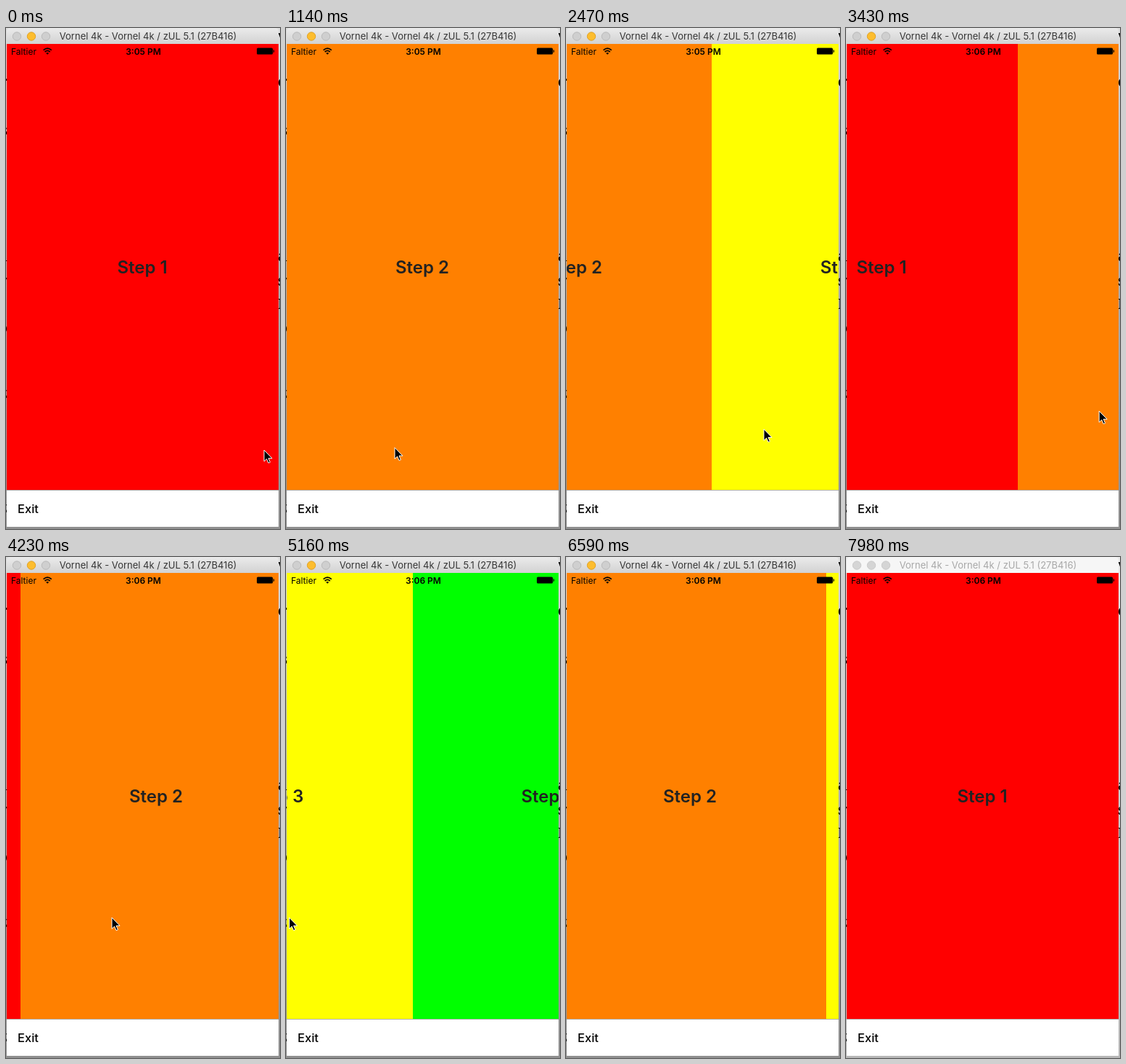
These frames come from a looping animation (378 px wide and 692 px high, 8.08 s). An HTML page:

```html
<!DOCTYPE html>
<html lang="en">
<head>
<meta charset="utf-8">
<title>Paged steps</title>
<style>
  html, body { margin: 0; width: 100%; height: 100%; overflow: hidden; background: #fff; }
  svg { display: block; width: 378px; height: 692px; font-family: Inter, Roboto, sans-serif; }
  .behind { font: 19px "Noto Serif", serif; }
  .light { fill: #cfcfcf; stroke: #b9b9b9; }
  .light.amber { fill: #fdbd2e; stroke: #dfa023; }
  .title { font-size: 13px; fill: #363636; }
  .inactive .bar { fill: #f6f6f6; }
  .inactive .light { fill: #d5d5d5; stroke: #cacaca; }
  .inactive .title { fill: #a8a8a8; }
  .inactive .shade { opacity: .65; }
  .label { font-size: 24px; font-weight: 600; fill: #222; }
  .status { font-size: 12px; }
  .exit { font-size: 16.5px; font-weight: 500; }
</style>
</head>
<body>
<svg viewBox="0 0 378 692">
  <defs>
    <linearGradient id="metal" x2="0" y2="1">
      <stop stop-color="#ebebeb"/><stop offset="1" stop-color="#d2d2d2"/>
    </linearGradient>
    <linearGradient id="shadow" x2="0" y2="1">
      <stop stop-color="#dedede"/><stop offset=".3" stop-color="#bcbcbc"/><stop offset="1" stop-color="#909090"/>
    </linearGradient>
    <clipPath id="screen"><path d="M1 22h375v616H1z"/></clipPath>
  </defs>

  <g id="window">
    <path class="shade" fill="url(#shadow)" d="M0 0h378v692H0z"/>
    <g class="behind" text-anchor="end">
      <text x="2" y="81">r</text><text x="2" y="148">s</text><text x="2" y="322">l</text>
      <text x="2" y="356">v</text><text x="2" y="421">o</text><text x="2" y="511">z</text><text x="2" y="669">z</text>
    </g>
    <g class="behind">
      <text x="375" y="18">v</text><text x="375" y="81">e</text><text x="375" y="322">a</text>
      <text x="375" y="356">s</text><text x="375" y="388">E</text>
    </g>

    <path class="bar" fill="url(#metal)" d="M1 22V5q0-5 5-5h365q5 0 5 5v17z"/>
    <circle class="light" cx="15" cy="11.5" r="5.7"/>
    <circle class="light amber" cx="35" cy="11.5" r="5.7"/>
    <circle class="light" cx="55" cy="11.5" r="5.7"/>
    <text class="title" x="196" y="16" text-anchor="middle">Vornel 4k - Vornel 4k / zUL 5.1 (27B416)</text>

    <g clip-path="url(#screen)"><g id="pages"></g></g>

    <g class="status">
      <text x="7" y="37">Faltier</text>
      <g fill="none" stroke="#000" stroke-width="1.7">
        <path d="M51.6 30.6q5.6-5 11.2 0M53.6 33q3.6-3.2 7.2 0"/>
        <path d="M57.2 36.8l-2-2q2-1.5 4 0z" fill="#000" stroke="none"/>
      </g>
      <text id="clock" x="189.5" y="37" text-anchor="middle" font-weight="600"></text>
      <rect x="346" y="27.5" width="22" height="9" rx="1.5"/>
      <path d="M369 30.3q1.8 1.7 0 3.5z" stroke="#000" stroke-width=".7"/>
    </g>

    <path fill="#fff" d="M1 638h375v51H1z"/>
    <path fill="#b2b2b2" d="M1 638h375v1H1z"/>
    <text class="exit" x="16" y="669.5">Exit</text>
  </g>

  <path id="cursor" d="M0 0V15.5L3.6 12.2 6 17.8 8.4 16.8 6 11.3H11Z" stroke="#fff"/>
</svg>

<script>
const LOOP = 8080, PAGE_WIDTH = 375;
const DRAG = 140, RELEASE = 0.53, GLIDE = 475, STROKE = 200;
const byId = id => document.getElementById(id);
const clamp = u => Math.min(1, Math.max(0, u));

// Where the pages and the pointer rest before and after each swipe
const pageStops = [0, 1, 2, 1, 0, 1, 2, 3, 2, 1, 0];
const pointerStops = [356, 150, 73, 292, 350, 146, 75, -2, 150, 392, 331];

// Three slow swipes, then a quick steady rhythm
const swipeStart = i => [560, 1490, 2330][i] ?? 3255 + 588 * (i - 3);

byId("pages").innerHTML = ["#f00", "#ff8000", "#ff0", "#0f0"].map((color, i) =>
  `<g transform="translate(${1 + i * PAGE_WIDTH} 22)">
    <rect width="${PAGE_WIDTH}" height="616" fill="${color}"/>
    <text class="label" x="187" y="317" text-anchor="middle">Step ${i + 1}</text>
  </g>`).join("");

// A page follows the finger, then glides into place.
function pageEase(elapsed) {
  if (elapsed < DRAG) return RELEASE * clamp(elapsed / DRAG) ** 1.2;
  return 1 - (1 - RELEASE) * (1 - clamp((elapsed - DRAG) / GLIDE)) ** 3;
}

const strokeEase = elapsed => 1 - (1 - clamp(elapsed / STROKE)) ** 2;

// Adds up the eased steps between consecutive stops.
function follow(stops, ease, time) {
  return stops.reduce((value, stop, i) =>
    i ? value + (stop - stops[i - 1]) * ease(time - swipeStart(i - 1)) : stop, 0);
}

function pointerAt(time) {
  const strokes = follow([...pageStops.keys()], strokeEase, time);
  const leave = clamp((time - 7430) / 120);
  const x = follow(pointerStops, strokeEase, time) + 60 * leave;
  const y = 583 - 3.4 * Math.min(strokes, 5) ** 2 + 200 * leave;
  return [x, y];
}

function draw(now) {
  const time = now % LOOP;
  const offset = Math.round(follow(pageStops, pageEase, time) * PAGE_WIDTH);
  byId("pages").setAttribute("transform", `translate(${-offset} 0)`);
  byId("cursor").setAttribute("transform", `translate(${pointerAt(time)})`);
  byId("clock").textContent = time < 3400 ? "3:05 PM" : "3:06 PM";
  byId("window").classList.toggle("inactive", time >= 7980);
}

const startTime = performance.now();
function tick() {
  draw(performance.now() - startTime);
  requestAnimationFrame(tick);
}
tick();
</script>
</body>
</html>
```
